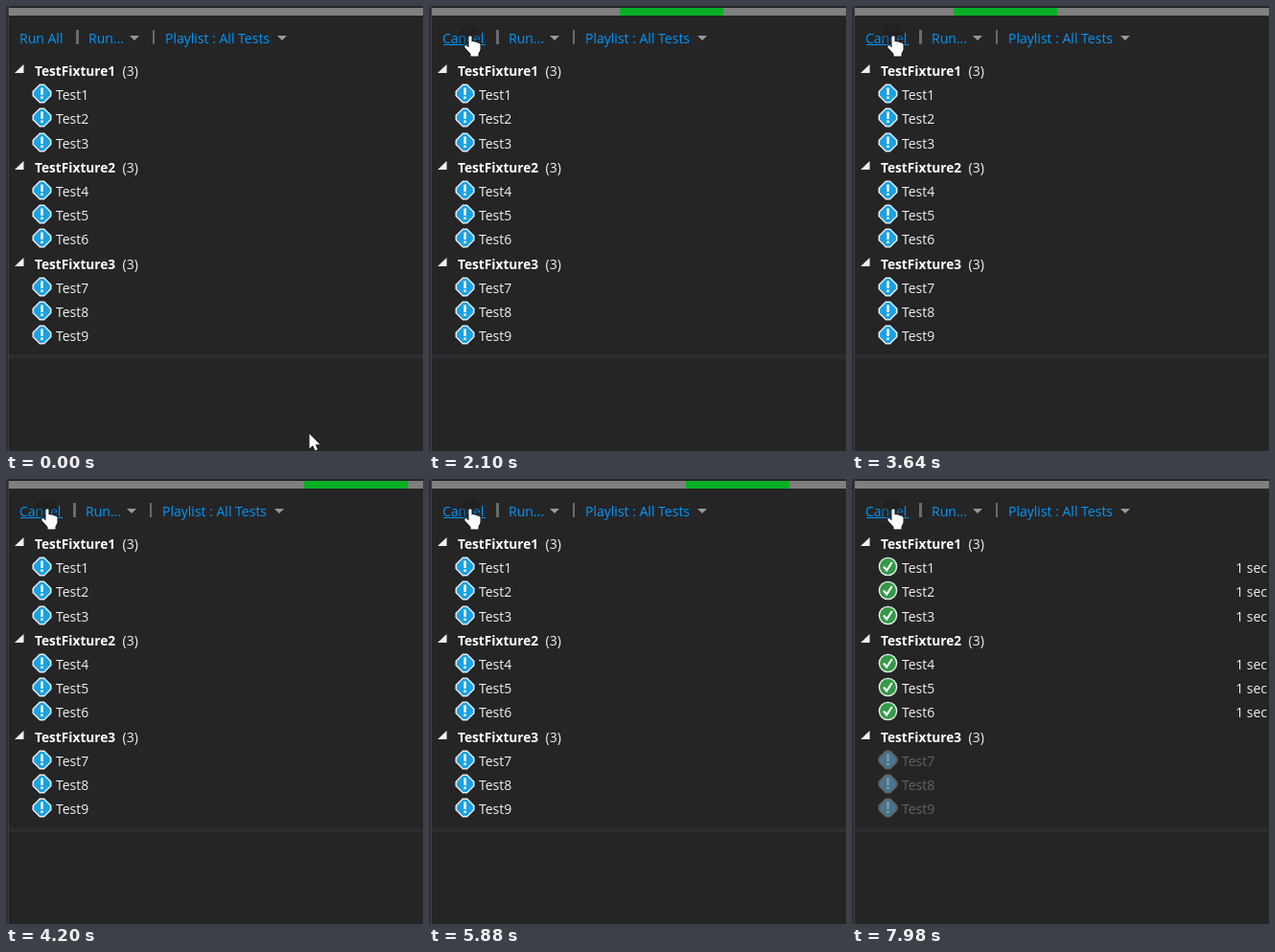
These frames come from a looping animation (435x465 px, 8000 ms). An HTML page with a canvas:

```html
<!DOCTYPE html>
<html lang="en">
<head>
<meta charset="utf-8">
<title>Test run</title>
<style>
  html, body { margin: 0; width: 100%; height: 100%; overflow: hidden; background: #252526; }
  canvas { display: block; }
</style>
</head>
<body>
<canvas id="stage" width="435" height="465"></canvas>
<script>
const ctx = document.getElementById('stage').getContext('2d');
const LOOP = 8000, STEP = 70;
const LINK = '#0097fb', LIGHT = '#f1f1f1';
const FONT = '"Open Sans", "Noto Sans", sans-serif';
const REGULAR = `14px ${FONT}`, BOLD = `bold 13.7px ${FONT}`;

const HAND = new Path2D('M5 1.5Q6.5 0 8 1.5V7Q9.5 6 11 7.3Q12.5 6.7 13.7 8Q16 7.5 17 9.5V15Q16 18 15 19V22H7V19.5L1 13Q0 10.5 2.5 10.7L5 13Z');
const ARROW = new Path2D('M0 0V15.5L3.6 12.2L6 17.5L8.6 16.4L6.3 11.3H11Z');

// Each sweep: start time, clip edge, then [step, right edge] points of the block
const BLOCK = 108;
const SWEEPS = [
  { start: 1610, clip: 106, keys: [[0, 128], [7, 307], [11, 409], [17, 562]] },
  { start: 3360, clip: 90, keys: [[0, 112], [4, 214], [11, 393], [17, 546]] },
  { start: 5180, clip: 101, keys: [[0, 128], [10, 376], [11, 404], [17, 557]] }
];

function rect(x, y, w, h, color) {
  ctx.fillStyle = color;
  ctx.fillRect(x, y, w, h);
}

function text(str, x, y, color = LIGHT, font = REGULAR) {
  ctx.font = font;
  ctx.fillStyle = color;
  ctx.fillText(str, x, y);
}

function polygon(points, color) {
  ctx.beginPath();
  points.forEach(([x, y]) => ctx.lineTo(x, y));
  ctx.closePath();
  ctx.fillStyle = color;
  ctx.fill();
}

function disc(x, y, r, color) {
  ctx.beginPath();
  ctx.arc(x, y, r, 0, 7);
  ctx.fillStyle = color;
  ctx.fill();
}

function interpolate(keys, n) {
  const i = keys.findIndex(([step]) => step >= n);
  if (i < 1) return keys[0][1];
  const [a, va] = keys[i - 1], [b, vb] = keys[i];
  return va + (vb - va) * (n - a) / (b - a);
}

function drawProgress(t) {
  rect(3, 2, 432, 8, '#808080');
  if (t >= 1050 && t < 1190) rect(3, 2, 25, 8, '#06b025');
  for (const { start, clip, keys } of SWEEPS) {
    const n = (t - start) / STEP;
    if (n < 0 || n >= 17) continue;
    const right = Math.round(interpolate(keys, n));
    const left = Math.max(clip, right - BLOCK);
    rect(left, 2, right - left, 8, '#06b025');
  }
}

function caret(x) {
  polygon([[x, 31], [x + 10, 31], [x + 5, 36]], '#999');
}

function drawToolbar(t) {
  const running = t >= 980, pressed = t >= 840 && !running;
  const shift = running ? -3 : 0;
  text(running ? 'Cancel' : 'Run All', 14, 38.5, pressed ? LIGHT : LINK);
  if (t >= 560 && !pressed) rect(15, 40, running ? 44 : 46, 1, LINK);
  rect(73 + shift, 25, 3, 15, '#6a6a6a');
  text('Run...', 86 + shift, 38.5, LINK);
  caret(129 + shift);
  rect(153 + shift, 25, 2, 15, '#6a6a6a');
  text('Playlist : All Tests', 166 + shift, 38.5, LINK);
  caret(283 + shift);
}

function octagon(x, y, r, cut, color) {
  polygon([[-cut, -r], [cut, -r], [r, -cut], [r, cut], [cut, r], [-cut, r], [-r, cut], [-r, -cut]]
    .map(([dx, dy]) => [x + dx, y + dy]), color);
}

function pendingIcon(x, y) {
  octagon(x, y, 10, 2.5, '#e4eef4');
  octagon(x, y, 8.4, 2, '#1ba1e2');
  rect(x - 1.2, y - 6, 2.4, 7.5, '#fff');
  rect(x - 1.2, y + 3, 2.4, 2.5, '#fff');
}

function passedIcon(x, y) {
  disc(x, y, 9.8, '#e8f2e8');
  disc(x, y, 8.4, '#339947');
  ctx.beginPath();
  ctx.moveTo(x - 4.5, y);
  ctx.lineTo(x - 1.3, y + 4);
  ctx.lineTo(x + 4.3, y - 4.5);
  ctx.strokeStyle = '#fff';
  ctx.lineWidth = 2.2;
  ctx.stroke();
}

function drawTests(t) {
  const passed = t >= 7980 ? 6 : t >= 6650 ? 2 : 0;
  for (let row = 0; row < 12; row++) {
    const y = Math.round(67 + 25.2 * row);
    const group = Math.floor(row / 4) + 1;
    if (row % 4 === 0) {
      polygon([[18.5, y - 6], [18.5, y + 3], [9, y + 3]], LIGHT);
      text('TestFixture' + group, 30, y + 6, '#fff', BOLD);
      text('(3)', 121.5, y + 6);
      continue;
    }
    const number = row - group + 1;
    const done = number <= passed;
    ctx.globalAlpha = passed && !done ? 0.3 : 1;
    (done ? passedIcon : pendingIcon)(37.5, y - 0.5);
    text('Test' + number, 52, y + 5.5);
    ctx.globalAlpha = 1;
    if (done) {
      ctx.textAlign = 'right';
      text('1 sec', 433, y + 5.5);
      ctx.textAlign = 'left';
    }
  }
}

function pointer(path, x, y) {
  ctx.save();
  ctx.translate(x, y);
  ctx.lineWidth = 1.4;
  ctx.strokeStyle = '#111';
  ctx.stroke(path);
  ctx.fillStyle = '#fff';
  ctx.fill(path);
  ctx.restore();
}

function drawCursor(t) {
  if (t < 560) {
    const p = t / 490;
    const eased = p * p * (3 - 2 * p);
    pointer(ARROW, 316.5 - 270 * eased, 447 - 439 * eased);
  } else if (t >= 840 && t < 1190) {
    ctx.beginPath();
    ctx.arc(42, 30, 7, 0, 7);
    ctx.strokeStyle = '#2a95e8';
    ctx.lineWidth = 5;
    ctx.stroke();
  } else {
    disc(42, 31, 11, 'rgba(25,25,25,.3)');
    pointer(HAND, 36.5, 30.5);
  }
}

function draw(now) {
  const t = Math.floor(now % LOOP / STEP) * STEP;
  rect(0, 0, 435, 465, '#252526');
  rect(0, 0, 2, 465, '#2d2d30');
  rect(2, 0, 1, 465, '#3f3f46');
  rect(3, 364, 432, 5, '#2d2d30');
  drawProgress(t);
  drawToolbar(t);
  drawTests(t);
  drawCursor(t);
  requestAnimationFrame(draw);
}

const origin = performance.now();
const tick = draw;
draw = now => tick(Math.max(0, now - origin));
draw(origin);
</script>
</body>
</html>
```
